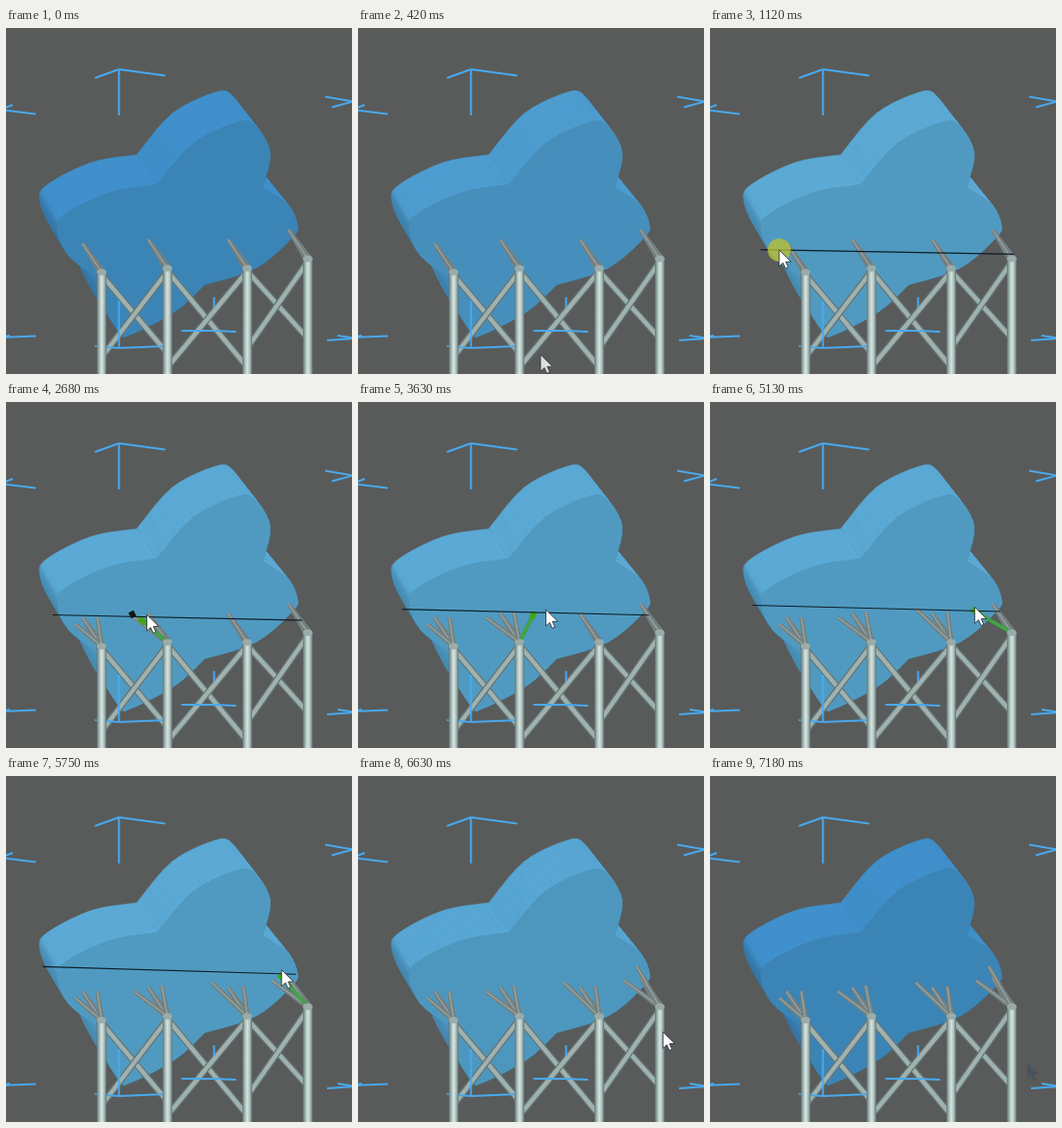
Write an HTML page with a canvas that moves like this. It is 360 px wide and 360 px high and loops after 7450 ms.

```html
<!DOCTYPE html>
<html lang="en">
<head>
<meta charset="utf-8">
<title>Placing support branches</title>
<style>
html, body { margin: 0; width: 100%; height: 100%; overflow: hidden; background: #585b5a; }
canvas { display: block; width: 100vw; height: 100vh; }
</style>
</head>
<body>
<canvas id="stage" width="360" height="360"></canvas>
<script>
const ctx = document.getElementById('stage').getContext('2d');
const LOOP = 7450, MOVE = 300, LEAVE = 6500;

const pillars = [[99.5, 254], [168, 250], [251, 250], [314, 240]];

// Cursor stops: departure time towards the stop, x, y; a branch is placed at each
const stops = [
  [470, 72, 231], [1300, 95, 224], [2040, 133, 224], [2600, 162, 218],
  [3510, 214, 215], [4260, 247, 219], [4900, 277, 213], [5600, 290, 198]
];
const route = [[0, 190, 340], ...stops, [LEAVE, 330, 298]];

// Key points of the four front lobes, clockwise from the upper notch backwards
const lobes = [
  [[157, 163], [108, 171], [61, 194], [53, 210], [65, 237], [93, 259]],
  [[93, 259], [97, 281], [118, 317], [130, 319], [176, 295], [207, 267]],
  [[207, 267], [260, 250], [298, 218], [303, 204], [292, 182], [267, 166]],
  [[267, 166], [275, 130], [259, 101], [241, 98], [195, 120], [157, 163]]
];

const clamp = v => Math.max(0, Math.min(1, v));
const ramp = (t, a, b) => clamp((t - a) / (b - a));
const mix = (a, b, k) => a + (b - a) * k;
const mixAll = (a, b, k) => a.map((v, i) => mix(v, b[i], k));
const easeOut = k => 1 - (1 - k) ** 2;
const rgb = c => `rgb(${c.map(Math.round).join(',')})`;

// Catmull-Rom samples through the key points
function smooth(points, steps = 5) {
  const out = [];
  for (let i = 0; i < points.length - 1; i++) {
    const b = points[i], c = points[i + 1], a = points[i - 1] || b, d = points[i + 2] || c;
    for (let s = 0; s < steps; s++) {
      const k = s / steps;
      out.push([0, 1].map(n => b[n] + k / 2 * (c[n] - a[n]
        + k * (2 * a[n] - 5 * b[n] + 4 * c[n] - d[n] + k * (3 * (b[n] - c[n]) + d[n] - a[n])))));
    }
  }
  return out;
}

const outline = lobes.flatMap(lobe => smooth(lobe));
const toBack = ([x, y]) => [x - 21 - 0.03 * (x - 157), y - 31];

const placements = stops.map(([move, x, y], i) => ({
  x, y,
  from: move + MOVE + 80,
  to: Math.min(move + 700, (stops[i + 1] || [LEAVE])[0])
}));

function cursorAt(t) {
  const i = route.findLastIndex(stop => t >= stop[0]);
  const here = route[Math.max(i, 0)], before = route[Math.max(i - 1, 0)];
  const k = easeOut(ramp(t, here[0], here[0] + MOVE));
  return [mix(before[1], here[1], k), mix(before[2], here[2], k)];
}

// Branches lean left, so the reach of each pillar is shifted that way
const pillarFor = x => pillars.reduce((best, p) =>
  Math.abs(p[0] - 20 - x) < Math.abs(best[0] - 20 - x) ? p : best);

function path(points) {
  ctx.beginPath();
  points.forEach(p => ctx.lineTo(...p));
}

function polygon(points, color) {
  path(points);
  ctx.closePath();
  ctx.fillStyle = color;
  ctx.fill();
}

function stroke(points, color, width) {
  path(points);
  ctx.strokeStyle = color;
  ctx.lineWidth = width;
  ctx.stroke();
}

function corner(x, y, ...arms) {
  arms.forEach(([dx, dy]) => stroke([[x, y], [x + dx, y + dy]], '#49a9ef', 2));
}

function drawOuterCorners() {
  corner(117.5, 43, [-25, 9], [48, 6.5], [0, 48]);
  corner(-6, 85, [37, 4.5], [13, -5]);
  corner(361, 76.5, [-29, -5], [-22, 6]);
  corner(-6, 322, [37, -1.5], [10, -2]);
  corner(364, 323, [-30, 2], [-19, -3]);
}

function drawInnerCorners() {
  corner(117.5, 333, [-25, -2], [49, -2], [0, -49]);
  corner(216.5, 315, [-34, 0], [23, 1]);
  corner(216.5, 291, [0, -11]);
}

function drawCloud(glow) {
  const lit = mixAll([63, 144, 204], [91, 170, 214], glow);
  const shaded = mixAll([52, 120, 170], [70, 141, 182], glow);
  outline.forEach((p, i) => {
    const q = outline[(i + 1) % outline.length];
    const up = (p[0] - q[0]) / Math.hypot(p[0] - q[0], p[1] - q[1]);
    const color = rgb(mixAll(shaded, lit, clamp(0.3 + up)));
    const quad = [p, q, toBack(q), toBack(p), p];
    polygon(quad, color);
    stroke(quad, color, 0.6);
  });
  polygon(outline, rgb(mixAll([59, 132, 182], [80, 154, 193], glow)));
}

function rod(a, b, width) {
  stroke([a, b], '#667777', width);
  stroke([a, b], '#9fb2b0', width * 0.62);
}

function drawBraces() {
  for (let i = 1; i < pillars.length; i++) {
    const [x0, y0] = pillars[i - 1], [x1, y1] = pillars[i];
    const drop = x1 - x0 + 20;
    rod([x0, y0 + 3], [x1, y1 + drop], 7);
    rod([x1, y1 + 3], [x0, y0 + drop], 7);
  }
}

function drawPillars() {
  for (const [x, y] of pillars) {
    const g = ctx.createLinearGradient(x - 5, 0, x + 5, 0);
    ['#62716f', '#a3b7b4', '#d6e6e2', '#adc0bd', '#5f706f']
      .forEach((c, i) => g.addColorStop(i / 4, c));
    ctx.fillStyle = g;
    ctx.fillRect(x - 5, y, 10, 360 - y);
    ctx.beginPath();
    ctx.ellipse(x, y, 5, 3.5, 0, 0, 7);
    ctx.fillStyle = '#9aaba9';
    ctx.fill();
  }
}

function branch(base, tip, w0, w1, color, shine) {
  const len = Math.hypot(tip[0] - base[0], tip[1] - base[1]) || 1;
  const nx = (base[1] - tip[1]) / len / 2, ny = (tip[0] - base[0]) / len / 2;
  const side = ([x, y], w) => [x + nx * w, y + ny * w];
  polygon([side(base, w0), side(tip, w1), side(tip, -w1), side(base, -w0)], color);
  stroke([base, tip], shine, 1.4);
}

function drawBranches(t) {
  pillars.forEach(p => branch(p, [p[0] - 20, p[1] - 30], 9, 4, '#737f80', '#939f9f'));
  for (const { x, y, to } of placements) {
    if (t < to) continue;
    branch(pillarFor(x), [x, y], 6, 4, '#74817f', '#98a4a2');
    if (t < to + 130) stroke([[x - 3, y - 6], [x, y]], '#101512', 6);
  }
}

function drawPreview(t) {
  if (t < stops[0][0] + MOVE || t >= placements[7].to) return;
  const [x, y] = cursorAt(t - 50);
  const base = pillarFor(x), tip = [x, y + 2];
  branch(base, tip, 4, 4, '#3f9c45', '#4aa848');
  stroke([tip, mixAll(tip, base, 0.22)], '#3fa515', 6);
}

// The cutting plane follows the cursor and tilts more as it rises
function drawSection(x, y) {
  const slope = 0.018 + 0.0004 * (231 - y);
  const at = px => y + 0.28 * Math.sqrt(Math.max(0, x - 72)) + slope * (px - x);
  const left = 38 + 0.45 * (at(45) - 198);
  const right = 302 + Math.max(0, at(302) - 221);
  stroke([[left, at(left)], [right, at(right)]], '#0c1c26', 1.1);
}

function drawPointer(x, y, t) {
  const arrow = [[0, 0], [0, 17], [4, 13.4], [6.6, 19.3], [9.4, 18], [6.8, 12.3], [12.3, 12.2], [0, 0]]
    .map(([dx, dy]) => [x + dx, y + dy]);
  ctx.globalAlpha = ramp(t, LEAVE + 350, LEAVE + 500) * 0.5;
  polygon(arrow, '#3a4c62');
  ctx.globalAlpha = ramp(t, 300, 450) * (1 - ramp(t, LEAVE + 250, LEAVE + 500));
  polygon(arrow, '#fff');
  stroke(arrow, '#20282c', 0.8);
  ctx.globalAlpha = 1;
}

function draw(t) {
  const glow = ramp(t, 350, 490) * (1 - ramp(t, LEAVE + 100, LEAVE + 300));
  const [x, y] = cursorAt(t);
  const pressed = placements.some(p => t >= p.from && t < p.to);

  ctx.fillStyle = '#585b5a';
  ctx.fillRect(0, 0, 360, 360);
  drawOuterCorners();
  drawCloud(glow);
  drawBraces();
  drawInnerCorners();
  drawBranches(t);
  if (!pressed) drawPreview(t);
  drawPillars();
  if (glow > 0.5 && y < 262) drawSection(x, y);
  if (pressed) {
    ctx.beginPath();
    ctx.arc(x, y, 12, 0, 7);
    ctx.fillStyle = 'rgba(190,196,42,.74)';
    ctx.fill();
  }
  drawPointer(x, y, t);
}

const start = performance.now();
function tick() {
  draw((performance.now() - start) % LOOP);
  requestAnimationFrame(tick);
}
tick();
</script>
</body>
</html>
```
